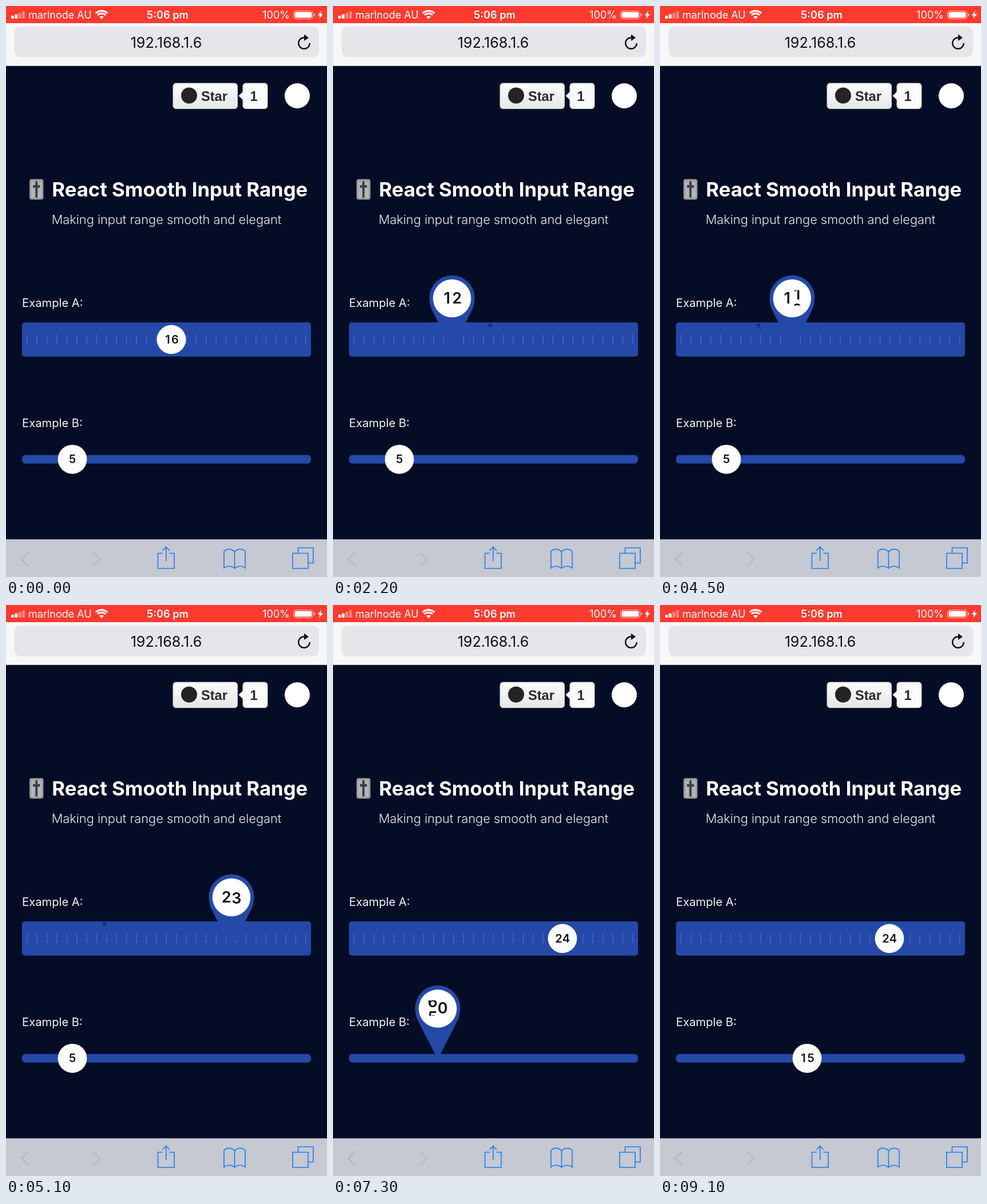
Animation, 561 px wide and 998 px high, one loop 9.2 s. Source, as an HTML page with a canvas:

```html
<!DOCTYPE html>
<html lang="en">
<head>
<meta charset="utf-8">
<title>Smooth input range</title>
<style>
  html, body { margin: 0; width: 100%; height: 100%; overflow: hidden; background: #050d26; }
  canvas { display: block; }
</style>
</head>
<body>
<canvas id="stage" width="561" height="998"></canvas>
<script>
const ctx = document.getElementById('stage').getContext('2d');
const LOOP = 9200, STEP = 100, ROLL = 200;
const SANS = 'Inter, "Open Sans", sans-serif';
const HELV = '"Liberation Sans", Arial, sans-serif';
const BLUE = '#2449a8', PAGE = '#050d26', ICON = '#1a7df0';

// Each slider: drag points are [time, x], grip is [start, end] of a press and a release.
const sliders = [
  {
    y: 582.9, lift: -72.2, zero: 65, unit: 14, press: [500, 1000], release: [5250, 5700],
    drag: [[1300, 289], [1600, 284], [2000, 243], [2200, 208], [2400, 187], [2800, 181],
           [4100, 181], [4400, 208], [4700, 290], [5000, 382], [5100, 394], [5250, 401]]
  },
  {
    y: 792.3, lift: -87.2, zero: 45.5, unit: 14.1, press: [6200, 6700], release: [8700, 9100],
    drag: [[6800, 116], [7000, 139], [7200, 172], [7300, 183], [7600, 235], [8000, 312],
           [8200, 322], [8300, 315], [8400, 310], [8550, 280], [8720, 257]]
  }
];
const marks = [[275, 1500, 3600], [172, 4300, 5700]];

const clamp = v => Math.min(1, Math.max(0, v));
const mix = (a, b, p) => a + (b - a) * p;
const easeOut = p => 1 - (1 - clamp(p)) ** 3;

// Cubic curve through the points, at rest at both ends.
function follow(points, t) {
  const last = points.length - 1;
  if (t <= points[0][0]) return points[0][1];
  if (t >= points[last][0]) return points[last][1];
  let i = 0;
  while (t > points[i + 1][0]) i++;
  const slope = k => {
    if (k === 0 || k === last) return 0;
    const [a, b, c] = [points[k - 1], points[k], points[k + 1]];
    if ((b[1] - a[1]) * (c[1] - b[1]) <= 0) return 0;
    return (c[1] - a[1]) / (c[0] - a[0]);
  };
  const [t0, x0] = points[i], [t1, x1] = points[i + 1];
  const d = t1 - t0, u = (t - t0) / d, v = 1 - u;
  return v * v * (1 + 2 * u) * x0 + u * u * (3 - 2 * u) * x1
    + d * (u * v * v * slope(i) - u * u * v * slope(i + 1));
}

const valueAt = (s, t) => Math.ceil((follow(s.drag, t) - s.zero) / s.unit - 1e-6);

function box(x, y, w, h, r, fill, stroke, width = 1) {
  ctx.beginPath();
  ctx.roundRect(x, y, w, h, r);
  if (fill) { ctx.fillStyle = fill; ctx.fill(); }
  if (stroke) { ctx.strokeStyle = stroke; ctx.lineWidth = width; ctx.stroke(); }
}

function disc(x, y, r, fill) {
  ctx.beginPath();
  ctx.arc(x, y, r, 0, 7);
  ctx.fillStyle = fill;
  ctx.fill();
}

function shape(d, color, width) {
  const path = new Path2D(d);
  if (width) {
    ctx.strokeStyle = color;
    ctx.lineWidth = width;
    ctx.stroke(path);
  } else {
    ctx.fillStyle = color;
    ctx.fill(path);
  }
}

function label(str, x, y, size, color, weight = 400, align = 'left', family = SANS) {
  ctx.font = `${weight} ${size}px ${family}`;
  ctx.textAlign = align;
  ctx.fillStyle = color;
  ctx.fillText(str, x, y);
}

function statusBar() {
  box(0, 0, 561, 30, 0, '#ff3b30');
  for (let i = 0; i < 4; i++) {
    const h = 5 + i * 2.6;
    box(9 + i * 6.4, 22 - h, 4.8, h, 1, i < 2 ? '#fff' : '#ffffff66');
  }
  label('marlnode AU', 39, 22, 18, '#fff');
  for (const r of [5.5, 10, 14.5]) {
    ctx.beginPath();
    if (r < 6) ctx.moveTo(167, 23);
    ctx.arc(167, 23, r, -Math.PI * 0.75, -Math.PI * 0.25);
    ctx.strokeStyle = ctx.fillStyle = '#fff';
    ctx.lineWidth = 2.8;
    if (r < 6) ctx.fill(); else ctx.stroke();
  }
  label('5:06 pm', 282.5, 22, 18.2, '#fff', 600, 'center');
  label('100%', 496, 22, 18, '#fff', 400, 'right');
  box(502.5, 8.5, 34, 14, 4, null, '#ffffffaa');
  box(504.5, 10.5, 30, 10, 2.5, '#fff');
  box(538, 13, 2, 5, 1, '#ffffffaa');
  shape('M551 8 L545 16.5 H548.5 L547 23 L554 14 H550 Z', '#fff');
}

function addressBar() {
  box(0, 30, 561, 74.7, 0, '#f8f7f8');
  box(15, 36, 532, 53.5, 10, '#e6e5e9');
  label('192.168.1.6', 280, 72.5, 25.2, '#111', 400, 'center');
  ctx.beginPath();
  ctx.arc(521, 65, 9.8, 0, -Math.PI * 0.42);
  ctx.strokeStyle = '#111';
  ctx.lineWidth = 2.4;
  ctx.stroke();
  shape('M521 49.5 L529 55.5 L521 61 Z', '#111');
}

function header() {
  const shade = ctx.createLinearGradient(0, 135, 0, 179);
  shade.addColorStop(0, '#fcfcfc');
  shade.addColorStop(1, '#e6e6e7');
  box(292, 135, 112.5, 44.5, 5, shade, '#d2d2d4');
  disc(320, 156.5, 14, '#242424');
  label('Star', 341, 166, 23.6, '#2b2b2d', 700, 'left', HELV);
  box(414, 135, 43, 44.5, 5, '#fafafa', '#d2d2d4');
  shape('M415 149 L406.5 157 L415 165 Z', '#fafafa');
  label('1', 433, 166, 23.6, '#2b2b2d', 700, 'center', HELV);
  disc(509, 157, 22, '#fff');

  box(41, 302.5, 24.5, 36, 4, '#8d9092');
  box(42.5, 304, 21.5, 33, 3, '#a3a6a8');
  for (let y = 309; y < 335; y += 3.4) {
    box(44.5, y, 5, 1.2, 0, '#d3d5d6');
    box(57, y, 5, 1.2, 0, '#d3d5d6');
  }
  box(51.6, 306, 3.2, 29, 1.5, '#303438');
  box(47, 313, 12.5, 4.5, 1, '#3c4044');
  label('React Smooth Input Range', 80.3, 333, 34.7, '#fff', 700);
  label('Making input range smooth and elegant', 280.5, 381, 21.8, '#e9ebf2', 300, 'center');
}

function tracks(t) {
  label('Example A:', 28, 526, 20.2, '#f2f3f7');
  label('Example B:', 28, 735.5, 20.2, '#f2f3f7');
  box(28, 553, 505, 59.8, 5, BLUE);
  for (let i = 0; i < 29; i++) box(36 + i * 17.4, 574.5, 1.3, 16.5, 0, '#4a6ccb');
  box(28, 784.8, 505, 15, 6, BLUE);
  for (const [x, from, to] of marks) {
    if (t >= from && t < to) disc(x, 558, 3.6, '#1b3270');
  }
}

// One rolling column; higher digits sit above lower ones.
function column(pos, x, y, size) {
  ctx.save();
  ctx.beginPath();
  ctx.rect(x - size * 0.45, y - size / 2, size * 0.9, size);
  ctx.clip();
  const low = Math.floor(pos);
  for (const d of [low, low + 1]) {
    label(String(d % 10), x, y + (pos - d) * size + size * 0.3635, size, '#141414', 600, 'center');
  }
  ctx.restore();
}

function digits(s, t, x, y, size) {
  const two = valueAt(s, t) >= 10;
  let first = 0, all = 0, units = 0, some = 0;
  for (let lag = 2.5; lag < ROLL; lag += 5) {
    const u = lag / ROLL, w = Math.min(u, 1 - u) ** 2, n = valueAt(s, t - lag);
    first += w * Number(String(n)[0]);
    all += w;
    if (n >= 10) { units += w * n; some += w; }
  }
  const gap = two ? size * 0.325 : 0;
  column(first / all, x - gap, y, size);
  if (two) column((some ? units / some : valueAt(s, t)) % 10, x + gap, y, size);
}

function thumb(s, t) {
  const x = follow(s.drag, t);
  const open = easeOut((t - s.press[0]) / (s.press[1] - s.press[0]))
    - easeOut((t - s.release[0]) / (s.release[1] - s.release[0]));
  const y = s.y + s.lift * open;
  if (open > 0.01) {
    ctx.save();
    ctx.translate(x, y - 0.5 * open);
    ctx.scale(open, open);
    shape('M-39.5 0 A39.5 39.5 0 0 1 39.5 0 C39.5 9 37 18 33 25 L5 80 Q0 87 -5 80 L-33 25 C-37 18 -39.5 9 -39.5 0 Z', BLUE);
    ctx.restore();
  }
  disc(x, y + 0.3 * open, mix(25.4, 33.3, open), '#fff');
  digits(s, t, x, y - 0.6, mix(20, 27, open));
}

function toolbar() {
  box(0, 932.2, 561, 66, 0, '#c6c8d2');
  box(0, 932.2, 561, 0.8, 0, '#b4b6c1');
  shape('M39 955 L26.5 967 L39 979', '#b0b3be', 1.8);
  shape('M152 955 L164.5 967 L152 979', '#b5b8c3', 1.8);
  shape('M274 956.5 H265.5 V983 H294 V956.5 H285.5 M279.8 970 V945.5 M273.5 952 L279.8 945.5 L286 952', ICON, 1.6);
  shape('M399.5 954 C394 948 386 948 381 953 V982.5 C386 978 394 978 399.5 983 C405 978 413 978 418 982.5 V953 C413 948 405 948 399.5 954 V983', ICON, 1.6);
  shape('M501 956.5 H528 V983 H501 Z M510.5 956 V947 H537 V973.5 H528.5', ICON, 1.6);
}

function draw(t) {
  box(0, 0, 561, 998, 0, PAGE);
  statusBar();
  addressBar();
  header();
  tracks(t);
  for (const s of sliders) thumb(s, t);
  toolbar();
}

const start = performance.now();
function tick() {
  const t = (performance.now() - start) % LOOP;
  draw(Math.floor(t / STEP) * STEP);
  requestAnimationFrame(tick);
}
tick();
</script>
</body>
</html>
```
